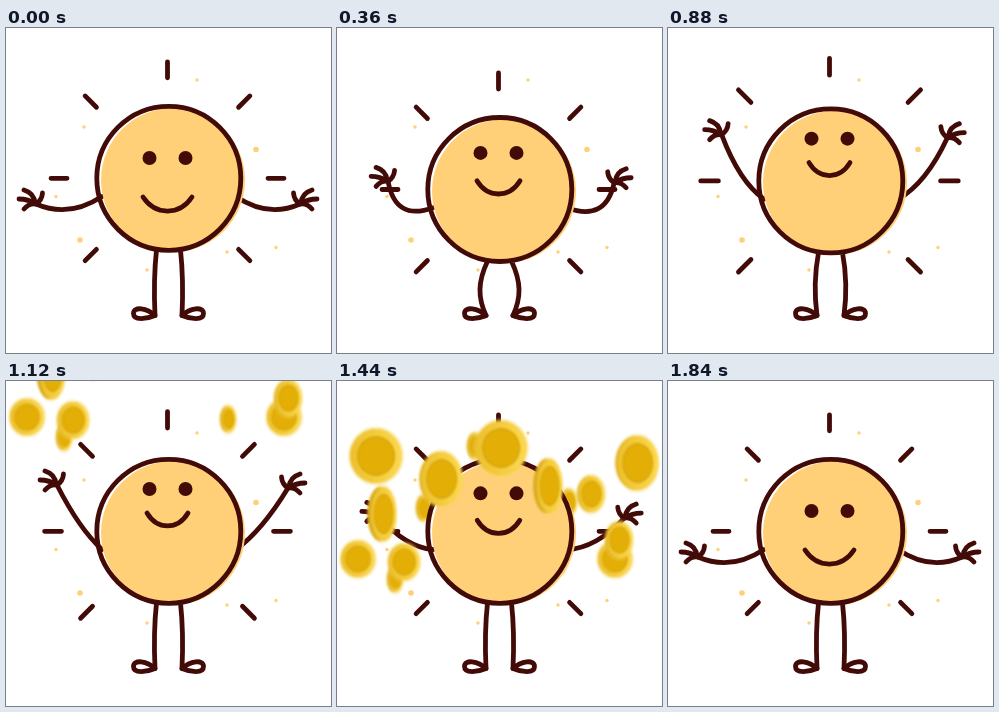
An HTML page that plays this animation: 325 by 325 pixels, repeating every 2.68 s.

```html
<!DOCTYPE html>
<html lang="en">
<head>
<meta charset="utf-8">
<title>Happy sun</title>
<style>
  html, body { margin: 0; width: 100%; height: 100%; overflow: hidden; background: #fff; }
  svg { display: block; width: 100vw; height: 100vh; }
  .ink { fill: none; stroke: #430b07; stroke-width: 4.8; stroke-linecap: round; stroke-linejoin: round; }
  .dark { fill: #430b07; }
  .sun { fill: #ffd077; }
  .dots { stroke: #ffd077; stroke-width: 3.4; stroke-linecap: round; }
  .coins { filter: blur(1px); }
</style>
</head>
<body>
<svg viewBox="0 0 325 325">
  <defs>
    <linearGradient id="rim">
      <stop offset="0" stop-color="#edc02c"/>
      <stop offset="1" stop-color="#fcd84f"/>
    </linearGradient>
    <path id="hand" d="M-17-5Q-8-5 0 0M-12-14Q-2-11-1-1M6.5-11Q6-4 0 0M-12 5Q-7-1 0 0"/>
    <path id="foot" d="M149 287.5C141 280 127.500 278 127.500 285.500C127.500 293 141 291 149 287.500"/>
  </defs>
  <path class="dots" d="M191 52h.01M78 99h.01M50 168.500h.01M141 242h.01M221 224h.01M270 219.500h.01"/>
  <path class="dots" style="stroke-width:5.6px" d="M250 121.500h.01M74 212h.01"/>
  <g id="back" class="coins"></g>
  <g class="ink">
    <path id="rays"/>
    <path id="legL"/>
    <use href="#foot"/>
    <g transform="matrix(-1 0 0 1 325 0)">
      <path id="legR"/>
      <use href="#foot"/>
    </g>
    <path id="armL"/>
    <use id="handL" href="#hand"/>
    <g transform="matrix(-1 0 0 1 326 0)">
      <path id="armR"/>
      <use id="handR" href="#hand"/>
    </g>
  </g>
  <g id="body">
    <circle class="sun" cx="167" cy="152" r="72"/>
    <circle class="ink" cx="162.800" cy="150.300" r="72"/>
    <g id="eyes" class="dark">
      <circle cx="143.500" cy="130" r="7"/>
      <circle cx="179.500" cy="130" r="7"/>
    </g>
    <path id="smile" class="ink"/>
  </g>
  <g id="front" class="coins"></g>
</svg>
<script>
const LOOP = 2680, STEP = 40, CX = 161.5, CY = 150.3;
const $ = id => document.getElementById(id);
const set = (id, name, value) => $(id).setAttribute(name, value);

// Smooth 0 to 1 between two times
function ramp(t, from, to) {
  const s = Math.min(1, Math.max(0, (t - from) / (to - from)));
  return s * s * (3 - 2 * s);
}

const oval = (x, y, rx, ry, fill, alpha = 1) =>
  `<ellipse cx="${x}" cy="${y}" rx="${rx}" ry="${ry}" fill="${fill}" opacity="${alpha}"/>`;

// A coin narrows as it turns and shows more of its edge
function coin(x, y, r, squash) {
  const rx = r * squash, edge = r * (1 - squash) * .25;
  return oval(x, y, rx + 1, r + 1.5, '#f6d867', .4) +
    oval(x - edge / 2, y, rx - 1, r - 1, '#d9aa1c') +
    oval(x + edge / 2, y, rx - 1, r - 1, 'url(#rim)') +
    oval(x + edge / 2, y, rx * .71, r * .71, '#d3a20d') +
    oval(x + edge / 2, y, rx * .66, r * .66, '#e3ae05');
}

const coins = (points, r, base, tilt) =>
  points.map(([x, y], i) => coin(x, y, r, base - tilt * [0, 1, .4][i % 3])).join('');

const big = [[39, 75], [45, 133], [104, 98], [164, 67], [211, 105], [300, 82]];
const medium = [[21, 178], [254, 113], [67, 181], [278, 178], [282, 159]];
const small = [[58, 198], [87, 127], [138, 65], [232, 121], [222, 180]];
$('back').innerHTML = coins(small, 14, .6, 0);
$('front').innerHTML = coins(medium, 19, .95, .2) + coins(big, 28, .96, .46);

function drawRays(drop, spread) {
  let d = '';
  for (let deg = 135; deg <= 405; deg += 45) {
    const a = deg * Math.PI / 180;
    const grow = 1 + spread * (deg === 270 ? .5 : 1);
    const point = r => `${CX + r * grow * Math.cos(a)} ${CY + drop + r * grow * Math.sin(a)}`;
    d += `M${point(100.5)}L${point(116.5)}`;
  }
  set('rays', 'd', d);
}

// The elbow hangs lower and further out while the body is down
function drawArm(side, drop, lift, dx, dy) {
  const sx = 96, sy = 168.5 + drop;
  const wx = -66 + 21 * lift + drop + dx, wy = 7.5 - 72 * lift + dy;
  const ex = -.9 * drop, ey = 12 + .7 * drop - 4 * lift;
  const bend = k => `${wx * k + ex} ${wy * k + ey}`;
  set('arm' + side, 'd', `M${sx} ${sy}c${bend(1 / 3)} ${bend(2 / 3)} ${wx} ${wy}`);
  set('hand' + side, 'transform', `translate(${sx + wx} ${sy + wy})`);
}

function drawLegs(drop) {
  const knee = 148 - .65 * drop;
  const d = `M150.5 ${222 + drop}C${knee} ${245 + drop * .8} ${knee} ${266 + drop * .3} 149 287.5`;
  set('legL', 'd', d);
  set('legR', 'd', d);
}

function drawFace(look) {
  set('eyes', 'transform', `translate(0 ${-22 * look})`);
  const half = 24.5 - 4 * look, dip = 18.7 - 1.5 * look;
  set('smile', 'd', `M${CX - half} ${169 - 37 * look}c${half / 2} ${dip} ${half * 1.5} ${dip} ${half * 2} 0`);
}

function drawCoins(t) {
  const u = t - 1440;
  const alpha = t < 800 ? 0 : Math.min(1, Math.max(0, (1650 - t) / 200));
  for (const id of ['back', 'front']) {
    set(id, 'transform', `translate(0 ${u * (.406 - .000117 * u)})`);
    set(id, 'opacity', alpha);
  }
}

function draw(t) {
  const crouch = ramp(t, 0, 360), reach = ramp(t, 360, 800);
  const drop = 11.2 * crouch * (1 - ramp(t, 360, 1120));
  const lift = (.47 * crouch + .53 * reach) * (1 - ramp(t, 1120, 1820));
  const look = (.74 * crouch + .26 * reach) * (1 - ramp(t, 1280, 1840));

  drawRays(drop, .11 * reach * (1 - ramp(t, 800, 1440)));
  drawArm('L', drop, lift, 0, 0);
  drawArm('R', drop, lift, 2 - 9 * lift, 3 * lift);
  drawLegs(drop);
  set('body', 'transform', `translate(0 ${drop})`);
  drawFace(look);
  drawCoins(t);
}

const start = performance.now();
function tick() {
  const t = (performance.now() - start) % LOOP;
  draw(Math.floor(t / STEP) * STEP);
  requestAnimationFrame(tick);
}
tick();
</script>
</body>
</html>
```
